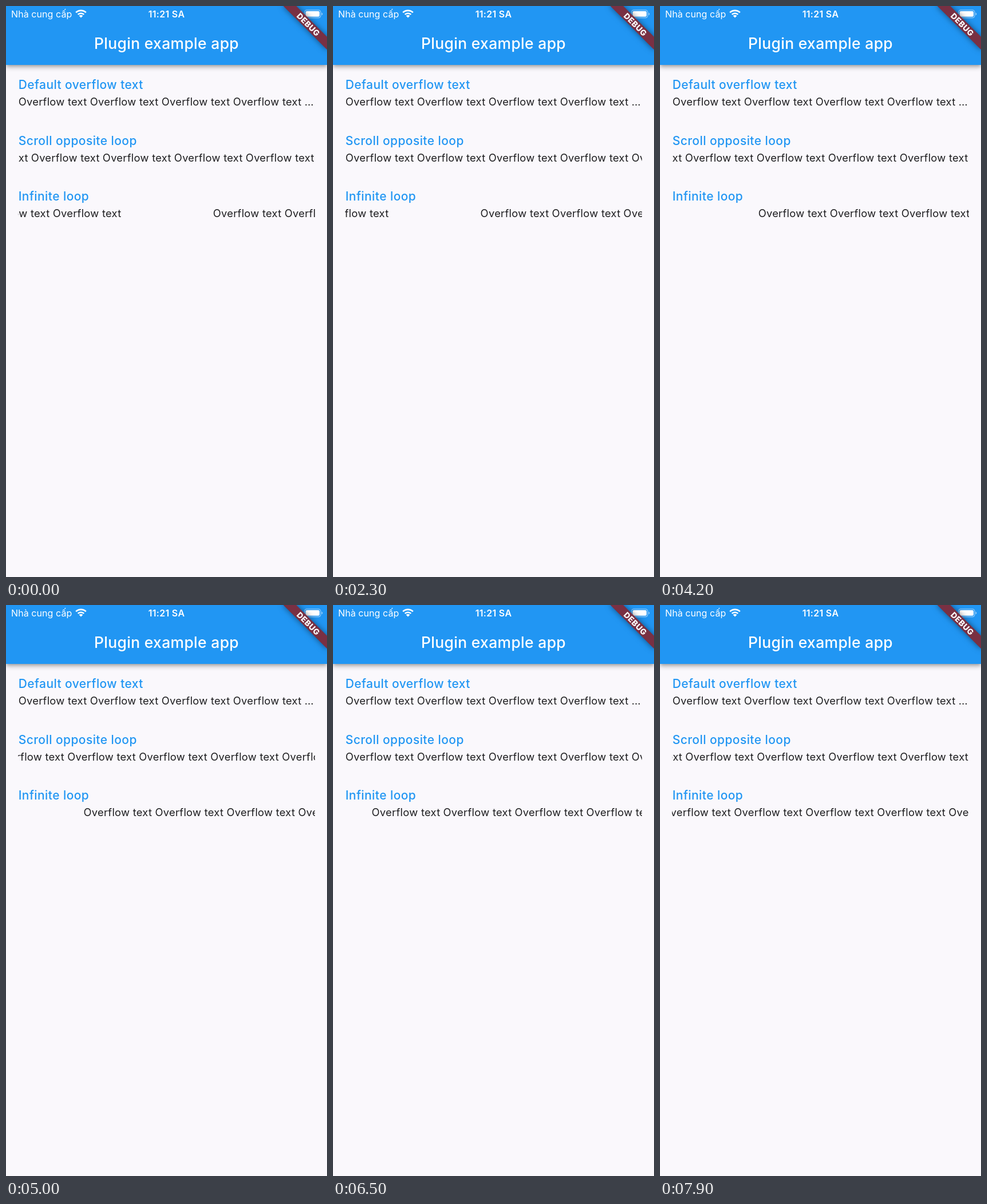
These frames come from a looping animation (561x998 px, 8 s). An HTML page:

```html
<!DOCTYPE html>
<html lang="vi">
<head>
<meta charset="utf-8">
<title>Plugin example app</title>
<style>
  html, body { margin: 0; width: 100%; height: 100%; overflow: hidden; }
  body { background: #faf8fc; font-family: Inter, Roboto, sans-serif; }
  #stage { position: relative; width: 561px; height: 998px; overflow: hidden; }

  header {
    position: absolute; inset: 0 0 auto; height: 103px;
    background: #2196f3; color: #fff; text-align: center;
    box-shadow: 0 3px 5px -1px rgba(0,0,0,.2), 0 5px 7px rgba(0,0,0,.14), 0 1px 13px rgba(0,0,0,.12);
  }
  header > * { position: absolute; white-space: nowrap; }
  .carrier { left: 9px; top: 4px; font-size: 16px; line-height: 20px; letter-spacing: .08px; }
  .clock { left: 0; right: 0; top: 4px; font-size: 16px; line-height: 20px; font-weight: 600; letter-spacing: .3px; }
  h1 { left: 0; right: 0; top: 45px; margin: 0; font-size: 26.5px; line-height: 40px; font-weight: 500; letter-spacing: .31px; }
  header svg { left: 0; top: 0; }

  .corner { position: absolute; left: 561px; top: 0; transform: rotate(45deg); transform-origin: 0 0; }
  .corner b {
    position: absolute; left: -54.2px; top: 37.9px; width: 108.4px; height: 16.3px;
    background: #793043; color: #fff; box-shadow: 0 0 10.7px rgba(0,0,0,.5);
    font-size: 13.8px; line-height: 16.3px; font-weight: 800; letter-spacing: .5px; text-align: center;
  }

  section { position: absolute; left: 21px; width: 519px; height: 60px; }
  section:nth-of-type(1) { top: 122.8px; }
  section:nth-of-type(2) { top: 220.5px; }
  section:nth-of-type(3) { top: 318.2px; }
  h2 { margin: 0 0 0 .7px; color: #2196f3; font-size: 21px; line-height: 30px; font-weight: 500; letter-spacing: .42px; white-space: nowrap; }
  .row {
    position: relative; top: -.8px; height: 30px; overflow: hidden; white-space: nowrap;
    color: #1e1e20; font-size: 18.4px; line-height: 30px; letter-spacing: .24px;
  }
  .run { position: absolute; left: .7px; top: 0; display: flex; }
  .run span { flex: 0 0 125px; }
</style>
</head>
<body>
<div id="stage">
  <section><h2>Default overflow text</h2><div class="row"><div class="run" data-words="4" data-end="…"></div></div></section>
  <section><h2>Scroll opposite loop</h2><div class="row"><div class="run" id="swing" data-words="5"></div></div></section>
  <section><h2>Infinite loop</h2><div class="row"><div class="run" id="prev" data-words="5"></div><div class="run" id="next" data-words="5"></div></div></section>

  <header>
    <span class="carrier">Nhà cung cấp</span>
    <svg width="561" height="30" fill="none" stroke="#fff">
      <path d="M122.2 11.4a12.6 12.6 0 0 1 17.6 0M125.7 14.9a7.6 7.6 0 0 1 10.6 0" stroke-width="2.7"/>
      <path d="M131 20.6l-3.3-3.4a4.7 4.7 0 0 1 6.6 0z" fill="#fff" stroke="none"/>
      <rect x="521.7" y="7.2" width="28.2" height="13.4" rx="3.8" stroke-opacity=".5" stroke-width="1.3"/>
      <rect x="523.6" y="9.1" width="24.4" height="9.6" rx="2.2" fill="#fff" stroke="none"/>
      <path d="M551.6 11.6q1.8 .6 1.8 2.3t-1.8 2.3z" fill="#fff" fill-opacity=".55" stroke="none"/>
    </svg>
    <span class="clock">11:21 SA</span>
    <h1>Plugin example app</h1>
  </header>
  <div class="corner"><b>DEBUG</b></div>
</div>

<script>
  const LOOP = 8000, TICK = 100;
  const SPEED = 0.04525, FIRST_X = 340, COPY_GAP = 780;
  const TRAVEL = 103, MOVE = 1500, HALF = 2021, DEPART = 617;
  const $ = id => document.getElementById(id);

  for (const run of document.querySelectorAll('.run')) {
    const words = Array(+run.dataset.words).fill('Overflow text');
    if (run.dataset.end) words.push(run.dataset.end);
    for (const word of words) {
      run.appendChild(document.createElement('span')).textContent = word;
    }
  }

  const cubic = (a, b, c, d, s) => {
    const r = 1 - s;
    return a * r * r * r + 3 * b * r * r * s + 3 * c * r * s * s + d * s * s * s;
  };

  // Fast start, slow finish: two cubic curves joined at (0.198, 0.541).
  const ease = p => {
    if (p >= 1) return 1;
    const [xs, ys] = p < 0.198
      ? [[0, 0.056, 0.108, 0.198], [0, 0.024, 0.3085, 0.541]]
      : [[0.198, 0.3655, 0.5465, 1], [0.541, 1, 0.989, 1]];
    let lo = 0, hi = 1;
    for (let i = 0; i < 24; i++) {
      const mid = (lo + hi) / 2;
      if (cubic(...xs, mid) < p) lo = mid; else hi = mid;
    }
    return cubic(...ys, lo);
  };

  const swingX = t => {
    const turn = Math.floor((t - DEPART) / HALF);
    const p = ease((t - DEPART - turn * HALF) / MOVE);
    return -TRAVEL * (turn % 2 === 0 ? 1 - p : p);
  };

  const place = (id, x) => { $(id).style.transform = `translateX(${x.toFixed(2)}px)`; };

  const draw = t => {
    const x = FIRST_X - SPEED * t;
    place('swing', swingX(t));
    place('next', x);
    place('prev', x - COPY_GAP);
  };

  // The picture advances ten times a second.
  let start;
  const frame = now => {
    start ??= now;
    draw(Math.floor((now - start + 10) / TICK) * TICK % LOOP);
    requestAnimationFrame(frame);
  };
  draw(0);
  requestAnimationFrame(frame);
</script>
</body>
</html>
```
